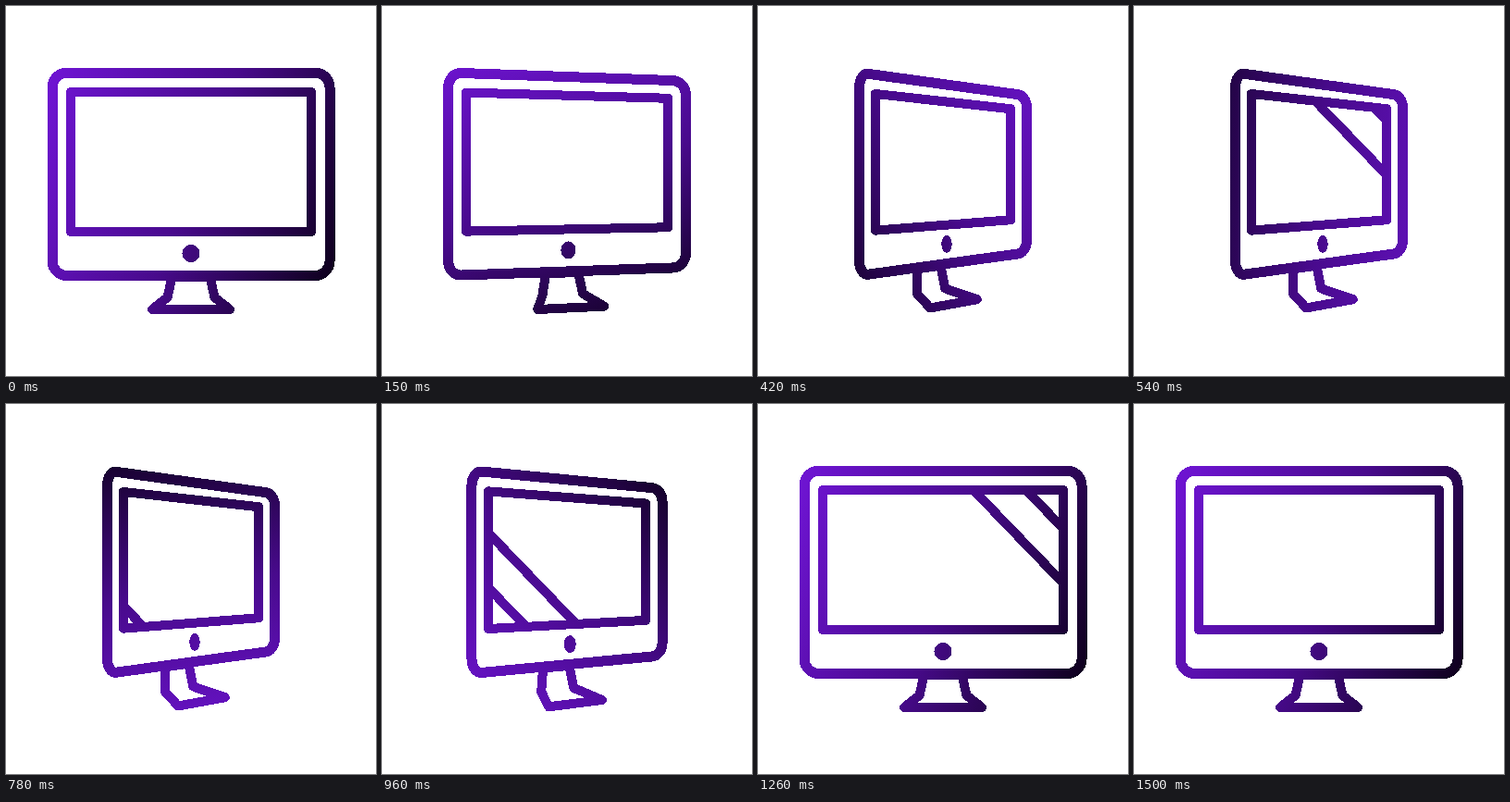
An HTML page for the animation above (3620 ms loop, 400x400 px).

```html
<!DOCTYPE html>
<html lang="en">
<head>
<meta charset="utf-8">
<title>Monitor</title>
<style>
  html, body { margin: 0; width: 100%; height: 100%; overflow: hidden; background: #fff; }
  svg { display: block; width: 100vw; height: 100vh; }
</style>
</head>
<body>
<svg viewBox="0 0 400 400" shape-rendering="crispEdges">
  <defs>
    <linearGradient id="ink" gradientUnits="userSpaceOnUse" x1="20" y1="200" x2="380" y2="200">
      <stop offset="0" stop-color="#6d14d0"/>
      <stop offset=".5" stop-color="#480a8c"/>
      <stop offset="1" stop-color="#0d001b"/>
    </linearGradient>
    <clipPath id="glass"><path id="pane"/></clipPath>
  </defs>
  <g fill="none" stroke="url(#ink)" stroke-width="10" stroke-linejoin="round" stroke-linecap="round">
    <path id="stand"/>
    <path id="body" stroke-width="11"/>
    <g clip-path="url(#glass)"><path id="shine"/></g>
    <path id="screen"/>
  </g>
  <ellipse id="dot" fill="url(#ink)"/>
</svg>
<script>
const LOOP = 3620, STEP = 30, LAST = 1500;
const TURN_TIME = 368, TURN_BACK = 851, SPIN_TIME = 1180, SHINE_BACK = 826;
const MID_X = 200, EYE_Y = 182, HALF = 150;
const SQUEEZE = 0.397, SHRINK = 0.227;

const $ = id => document.getElementById(id);
const clamp = u => Math.min(1, Math.max(0, u));
const ease = u => (u = clamp(u), u * u * (3 - 2 * u));
const toward = (a, b, u) => a.map((v, i) => v + (b[i] - v) * u);

// Squeeze x (offset from the middle), then pull y towards eye level on the far right side.
// dx and dy shift parts that lie in front of or behind the screen.
function project(x, y, turn, dx = 0, dy = 0, squeeze = SQUEEZE) {
  const px = x * (1 - squeeze * turn) + dx * turn;
  const side = HALF * (1 - SQUEEZE * turn);
  const far = (px + side) / (2 * side);
  return [MID_X + px, y + (EYE_Y - y) * SHRINK * turn * far + dy * turn];
}

function panel(half, top, bottom, radius, turn, squeeze) {
  const corners = [[-half, top], [half, top], [half, bottom], [-half, bottom]];
  const along = (a, b) => {
    const p = toward(a, b, radius / Math.hypot(b[0] - a[0], b[1] - a[1]));
    return project(...p, turn, 0, 0, squeeze);
  };
  return corners.map((c, i) => {
    const from = along(c, corners[(i + 3) % 4]);
    const to = along(c, corners[(i + 1) % 4]);
    const tip = project(...c, turn, 0, 0, squeeze);
    return `${i ? "L" : "M"}${from}C${toward(from, tip, 0.55)},${toward(to, tip, 0.55)},${to}`;
  }).join("") + "Z";
}

function standPath(turn) {
  // half width, y, shift x, shift y: neck, ankle, foot
  const levels = [[20.5, 293, -15, 0], [25.5, 315, -13, 6], [42, 328, 11.5, 12.5]];
  const side = s => levels.map(([w, y, dx, dy]) => project(s * w, y, turn, dx, dy));
  return `M${[...side(-1), ...side(1).reverse()].join("L")}Z`;
}

// Two parallel strokes sweep left, then back right.
function shinePath(t) {
  const rate = t < SHINE_BACK ? 0.00236 : 0.00187;
  const x = 460 * Math.sin(Math.min(Math.PI / 2, rate * Math.abs(t - SHINE_BACK)));
  const line = cx => `M${cx - 106} 58L${cx + 106} 278`;
  return line(x - 28.5) + line(x + 28.5);
}

function draw(t) {
  const turn = ease(t / TURN_TIME) - ease((t - TURN_BACK) / TURN_TIME);
  const pane = panel(130, 93, 244, 0, turn, 0.437);
  const set = (id, d) => $(id).setAttribute("d", d);
  set("body", panel(HALF, 72, 291.5, 16, turn));
  set("screen", pane);
  set("pane", pane);
  set("stand", standPath(turn));
  set("shine", shinePath(t));

  const [cx, cy] = project(0, 267.5, turn, 4);
  const dot = { cx, cy, rx: 9.5 * (1 - SQUEEZE * turn), ry: 9.5 };
  for (const k in dot) $("dot").setAttribute(k, dot[k]);

  const angle = 22 + 360 * clamp(t / SPIN_TIME);
  $("ink").setAttribute("gradientTransform", `rotate(${angle} 200 200)`);
}

const start = performance.now();
function tick() {
  const t = (performance.now() - start) % LOOP;
  draw(Math.min(LAST, Math.floor(t / STEP) * STEP));
  requestAnimationFrame(tick);
}
tick();
</script>
</body>
</html>
```
